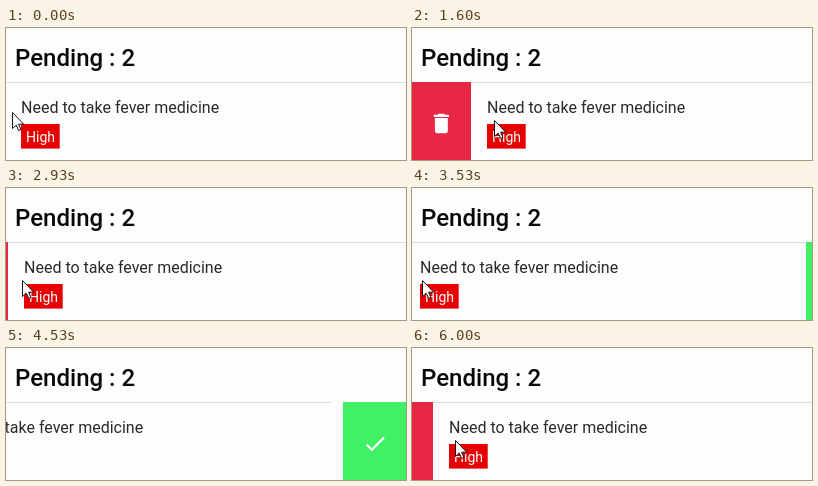
Animation of 400 by 132 pixels, one loop 6070 ms. Source, as an HTML page:

```html
<!DOCTYPE html>
<html lang="en">
<head>
<meta charset="utf-8">
<title>Swipe actions</title>
<style>
  html, body { margin: 0; width: 100%; height: 100%; overflow: hidden; background: #fdfdfd; }
  svg { display: block; font-family: Roboto, sans-serif; }
</style>
</head>
<body>
<svg width="400" height="132" viewBox="0 0 400 132">
  <text x="9" y="38" font-size="24" font-weight="500" fill="#080808">Pending : 2</text>

  <rect y="54" width="60" height="78" fill="#e62643"/>
  <path transform="translate(16.4 82.5) scale(1.08)" fill="#fff"
    d="M6 19c0 1.1.9 2 2 2h8c1.1 0 2-.9 2-2V7H6v12zM19 4h-3.5l-1-1h-5l-1 1H5v2h14V4z"/>
  <rect x="337" y="54" width="63" height="78" fill="#40f065"/>
  <path transform="translate(356.1 82.7) scale(1.08)" fill="#fff"
    d="M9 16.17L4.83 12l-1.42 1.41L9 19 21 7l-1.41-1.41z"/>

  <g id="item">
    <rect x="-1" y="54" width="402" height="78" fill="#fdfdfd"/>
    <rect x="-1" y="54" width="402" height="1" fill="#dcdcdc"/>
    <text x="15" y="85" font-size="16" fill="#2a2a2a">Need to take fever medicine</text>
    <rect x="15" y="96" width="38.7" height="24.6" fill="#e60000"/>
    <text x="34.5" y="114" font-size="14" text-anchor="middle" fill="#fff">High</text>
  </g>

  <path id="cursor" d="M.5.5V16.5l3.7-3.4 2.5 5.4 2.3-1-2.4-5.3H11.7z" fill="#fff" stroke="#111"/>
</svg>
<script>
const LOOP = 6070, STEP = 1000 / 15;
const item = document.getElementById('item');
const cursor = document.getElementById('cursor');

// Smooth change from 0 to 1 between two times
function ease(t, start, end) {
  const u = Math.min(1, Math.max(0, (t - start) / (end - start)));
  return u * u * (3 - 2 * u);
}

// Swipe right and back, then left in two pulls, then right again
const swipe = t =>
  72 * (ease(t, 720, 1900) - ease(t, 2450, 3000))
  - 30 * ease(t, 3320, 4000)
  - 46 * ease(t, 4267, 4533)
  + 3 * ease(t, 4930, 5067)
  + 95 * ease(t, 5400, 6000);

// Distance from the item's edge to the pointer
const grip = t =>
  6 + 21 * ease(t, 70, 730)
  - 16 * ease(t, 1200, 2270)
  + 6 * ease(t, 2470, 3530)
  + 4 * ease(t, 5400, 6000);

function place(node, x, y) {
  node.setAttribute('transform', `translate(${Math.round(x)} ${Math.round(y)})`);
}

function draw() {
  const t = Math.floor((performance.now() % LOOP + 3.4) / STEP) * STEP;
  const offset = swipe(t);
  place(item, offset, 0);
  place(cursor, offset + grip(t), 84 + 4 * ease(t, 70, 730) + 4 * ease(t, 1200, 1600));
  requestAnimationFrame(draw);
}
draw();
</script>
</body>
</html>
```
